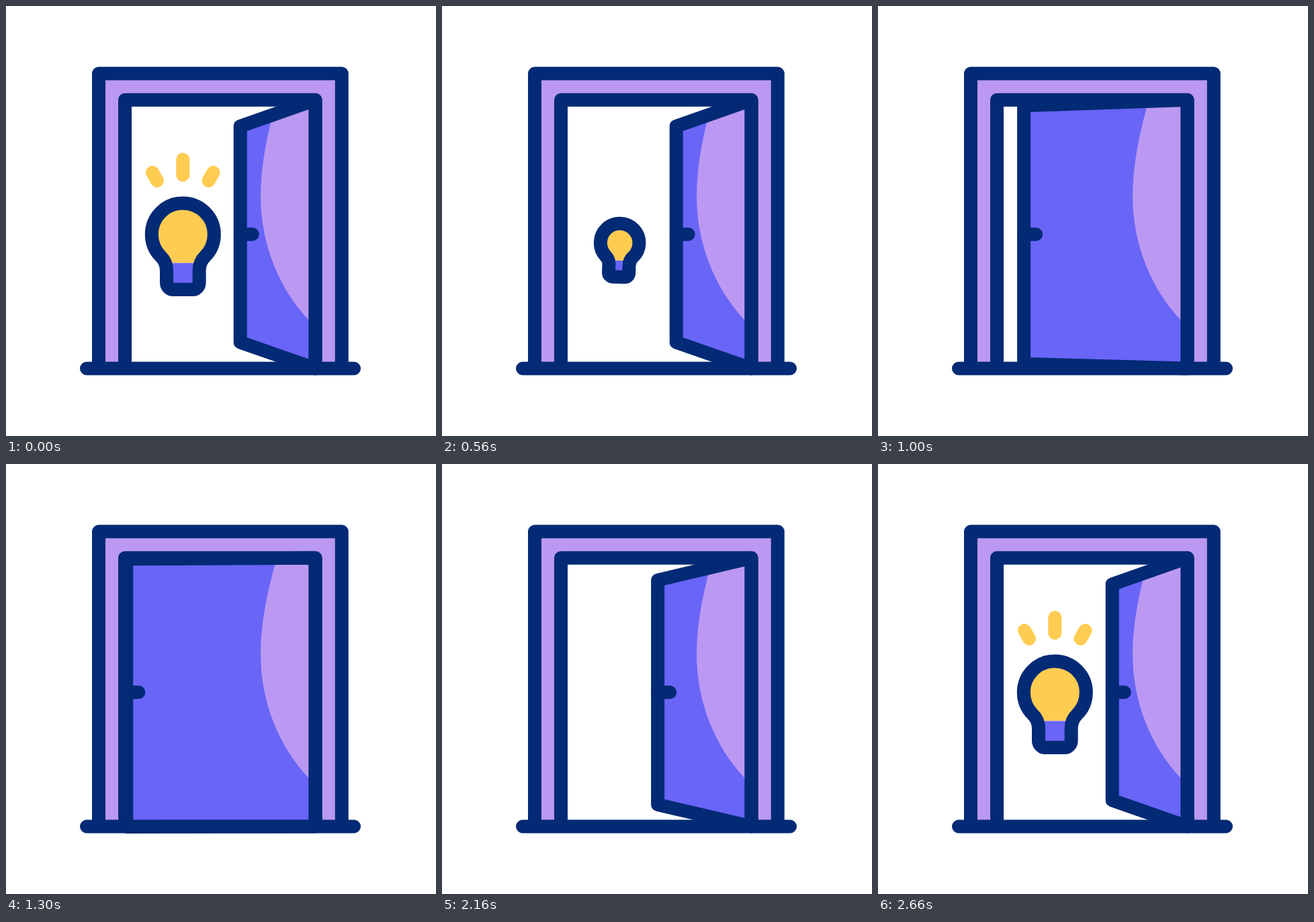
An HTML page for the animation above (3560 ms loop, 640x640 px).

```html
<!DOCTYPE html>
<html lang="en">
<head>
<meta charset="utf-8">
<title>Door and bulb</title>
<style>
html, body { margin: 0; width: 100%; height: 100%; overflow: hidden; background: #fff; }
svg { display: block; width: 100vw; height: 100vh; }
.line { stroke: #032a75; stroke-width: 20; stroke-linecap: round; stroke-linejoin: round; fill: none; }
.fixed { vector-effect: non-scaling-stroke; }
.ray { stroke: #ffcc52; stroke-width: 20; stroke-linecap: round; }
</style>
</head>
<body>
<svg viewBox="0 0 640 640">
  <defs>
    <clipPath id="doorClip"><path id="clipShape"/></clipPath>
    <path id="glass" d="M239 394C239 385 236 378 230.4 372.8A46.5 46.5 0 1 1 296.2 372.8C290.6 378 287.6 385 287.6 394V412a10 10 0 0 1-10 10H249a10 10 0 0 1-10-10Z"/>
    <clipPath id="glassClip"><use href="#glass"/></clipPath>
  </defs>

  <path d="M138 539.5V100.5H499.7V539.5Z" fill="#bb99f2"/>
  <path d="M177 539.5V139.8H460.5V539.5Z" fill="#fff"/>

  <g id="rays"></g>
  <g id="bulb">
    <g clip-path="url(#glassClip)">
      <rect x="200" y="280" width="130" height="102.5" fill="#ffcc52"/>
      <rect x="200" y="382.5" width="130" height="50" fill="#6965f7"/>
    </g>
    <use id="rim" href="#glass" class="line"/>
  </g>

  <g clip-path="url(#doorClip)">
    <rect x="160" y="130" width="310" height="420" fill="#6965f7"/>
    <path d="M403 140C388 192 379 240 379 283C379 354 406 420 450 467L470 487V140Z" fill="#bb99f2"/>
  </g>
  <path id="door" class="line"/>
  <path id="knob" class="line"/>

  <path class="line" d="M138 539.5V100.5H499.7V539.5M177 539.5V139.8H460.5V539.5M120 539.5H518"/>
</svg>
<script>
const LOOP = 3560;
const $ = id => document.getElementById(id);
const mix = (a, b, p) => a + (b - a) * p;

// cubic-bezier(.25, .1, .25, 1), solved by bisection
function ease(u) {
  if (u <= 0) return 0;
  if (u >= 1) return 1;
  let lo = 0, hi = 1;
  const curve = (t, a, b) => 3 * (1 - t) * (1 - t) * t * a + 3 * (1 - t) * t * t * b + t ** 3;
  for (let i = 0; i < 24; i++) {
    const mid = (lo + hi) / 2;
    if (curve(mid, .25, .25) < u) lo = mid; else hi = mid;
  }
  return curve(lo, .1, 1);
}
const span = (t, from, to) => ease((t - from) / (to - from));

// each ray: inner end, then outer end
const rays = [[225, 260, 218, 247.8], [263.3, 251.5, 263.3, 228.5], [301.5, 260, 308.5, 247.8]]
  .map(ends => {
    const el = document.createElementNS("http://www.w3.org/2000/svg", "path");
    el.setAttribute("class", "ray");
    $("rays").append(el);
    return { el, ends };
  });

function drawDoor(t) {
  const opening = t >= 1860;
  const shut = opening ? 1 - span(t, 1860, 2420) : span(t, 730, 1300);
  const lift = opening ? shut : shut ** .8;
  const x = mix(348.7, 179.3, shut);
  const top = mix(179, 141.3, lift), bottom = mix(500.5, 540, lift);
  const shape = `M${x} ${top}L460.5 139.8V539.5L${x} ${bottom}Z`;
  $("door").setAttribute("d", shape);
  $("clipShape").setAttribute("d", shape);
  $("knob").setAttribute("d", `M${x} 339.8h18`);
}

function drawBulb(t) {
  const size = t < 1800
    ? mix(mix(1, 1.13, span(t, 260, 480)), 0, span(t, 480, 780))
    : span(t, 2180, 2540);
  const tilt = t < 1800 ? 2 * span(t, 480, 560) : 0;
  $("bulb").style.display = size > .01 ? "" : "none";
  $("bulb").setAttribute("transform",
    `translate(265 373) rotate(${tilt}) scale(${Math.max(size, .01)}) translate(-265 -373)`);
  // the outline keeps its weight while the bulb scales
  $("rim").style.strokeWidth = Math.min(20, size * 100) / Math.max(size, .01);
}

function drawRays(t) {
  const grow = t < 1800 ? 1 - span(t, 260, 480) : span(t, 2440, 2680);
  $("rays").style.display = grow > .005 ? "" : "none";
  for (const { el, ends: [x, y, x2, y2] } of rays) {
    el.setAttribute("d", `M${x} ${y}L${mix(x, x2, grow)} ${mix(y, y2, grow)}`);
    el.style.strokeWidth = Math.min(20, grow * 60);
  }
}

const start = performance.now();
function frame() {
  const t = (performance.now() - start) % LOOP;
  drawDoor(t);
  drawBulb(t);
  drawRays(t);
  requestAnimationFrame(frame);
}
frame();
</script>
</body>
</html>
```
